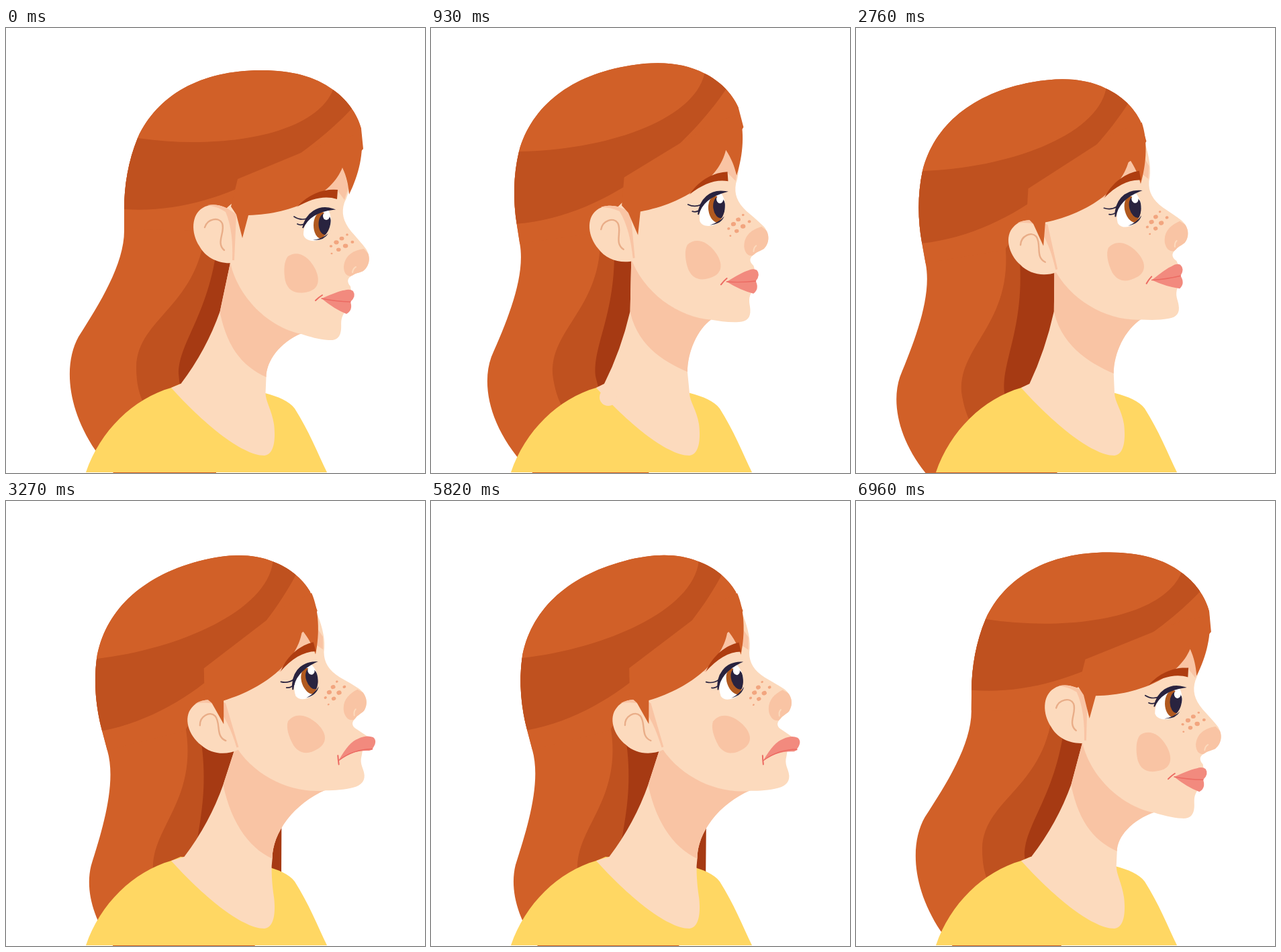
Write an HTML page with a canvas that moves like this. It is 624 px wide and 663 px high and loops after 7470 ms.

```html
<!DOCTYPE html>
<html lang="en">
<head>
<meta charset="utf-8">
<title>Head in profile</title>
<style>
html, body { margin: 0; width: 100%; height: 100%; overflow: hidden; background: #fff; }
canvas { display: block; }
</style>
</head>
<body>
<canvas id="stage" width="624" height="663"></canvas>
<script>
const ctx = document.getElementById('stage').getContext('2d');
const LOOP = 7470, STEP = 30;

const C = {
  hair: '#d16028', shade: '#bf511f', dark: '#a63a13',
  skin: '#fcdabd', blush: '#f9c4a4', freckle: '#f2a57f', earLine: '#e9ad88',
  shirt: '#ffd763', ink: '#29233f', iris: '#b0591f', brow: '#ae3d10',
  lip: '#f28a7e', lipLine: '#ec6a62'
};

// Key poses: face x, y, angle, then hair x, y, angle
const pose = {
  rest: [471, 293, 0, 196, 164, 0],
  nod: [496, 334, -9, 226, 180, -10.5],
  rise: [426, 269, 8, 131, 184, 8.9],
  back: [377, 272, 15.5, 57, 218, 9.2],
  push: [413, 269, 15, 99, 213, 10.3],
  out: [453, 267, 19, 135, 235, 15],
  fall: [467, 288, 8, 165, 192, 3.4],
  dip: [474, 300, 0, 194, 180, -3],
  settle: [473, 301, 1, 193, 176, -0.5]
};
const timeline = [
  [0, pose.rest], [540, pose.nod], [930, pose.rise], [1560, pose.back], [2160, pose.back],
  [2760, pose.push], [3060, pose.out], [5760, pose.out], [6300, pose.fall],
  [6510, pose.dip], [6960, pose.settle]
];

const P = d => new Path2D(d);
const SIL = 'M529,150 C523,127 507,106 487,92 C460,72 425,63 380,63 C290,63 225,100 196,164 C182,198 176,235 176,270 ';
const shapes = {
  back: P(SIL + 'L176,300 C177,350 140,410 108,460 C86,500 90,565 133,629 L175,682 L313,705 L313,540 L375,440 L390,320Z'),
  under: P('M298,290 C290,415 196,430 194,505 C194,530 198,545 206,562 L230,590 L300,590 L340,290Z'),
  inner: P('M317,295 C310,420 257,465 257,515 L262,565 L372,575 L380,540 L398,474 L400,445 L390,310Z'),
  crown: P(SIL + 'L176,300 L295,302 L335,262 L480,215 L514,200 L532,180Z'),
  band: P('M196,164 C320,182 460,160 487,92 L530,92 L515,120 C450,190 320,280 176,270 L150,270 L150,164Z'),
  fringe: P('M335,266 L343,278 L352,313 L361,279 C430,277 485,248 501,208 C507,221 510,234 511,248 C526,218 533,185 529,158 L490,165 L345,225Z'),
  browShade: P('M501,204 L510,238 L504,256 L492,240 C470,243 450,252 434,267 L400,250Z'),
  cheek: P('M420,340 C432,332 448,336 460,358 C469,376 465,389 450,393 C434,397 421,394 416,377 C413,362 414,347 420,340Z'),
  nose: P('M503,355 C505,338 518,331 533,329 L552,350 L536,370 L515,370 C506,370 503,364 503,355Z'),
  ear: P('M343,278 C325,262 305,260 293,268 C276,278 275,305 288,325 C297,342 317,352 338,350 L343,330Z'),
  earShade: P('M300,264 C315,261 330,267 343,278 L340,346 L337,346 C338,320 336,295 327,274 Q315,266 300,264Z'),
  earFold: P('M296,297 C300,284 317,281 322,291 C327,304 312,320 325,331'),
  eye: P('M443,308 C443,286 461,268 479,270 C487,280 486,305 466,316 C455,319 445,316 443,308Z'),
  lash: P('M487,270 C465,263 447,276 442,298 C449,282 463,273 487,270Z'),
  flicks: P('M448,284 Q438,287 429,281 M446,291 Q440,295 434,292'),
  lowLash: P('M457,316 Q471,314 480,306 Q474,317 457,316Z'),
  brow: P('M434,266 C452,246 475,239 494,241 L493,255 C475,249 455,254 434,266Z'),
  shirt: P('M119,662 C140,600 190,552 246,536 L260,530 L386,544 C405,549 422,556 430,567 C450,598 465,635 478,662Z')
};

const mix = (a, b, u) => a + (b - a) * u;

function ramp(t, from, to) {
  const u = Math.min(1, Math.max(0, (t - from) / (to - from)));
  return u * u * (3 - 2 * u);
}

// Hermite curve through the key poses that never overshoots them
function sample(t) {
  let i = 0;
  while (i < timeline.length - 1 && t >= timeline[i + 1][0]) i++;
  const [t0, a] = timeline[i];
  if (i === timeline.length - 1) return a;
  const [t1, b] = timeline[i + 1], span = t1 - t0, u = (t - t0) / span;
  const slope = (j, k) => (timeline[j + 1][1][k] - timeline[j][1][k]) / (timeline[j + 1][0] - timeline[j][0]);
  const tangent = (j, k) => {
    if (j === 0 || j === timeline.length - 1) return 0;
    const p = slope(j - 1, k), q = slope(j, k);
    return p * q <= 0 ? 0 : 2 * p * q / (p + q);
  };
  return a.map((v, k) => mix(v, b[k], u * u * (3 - 2 * u))
    + span * u * (1 - u) * (tangent(i, k) * (1 - u) - tangent(i + 1, k) * u));
}

function fill(shape, color) {
  ctx.fillStyle = color;
  ctx.fill(shape);
}

function line(shape, color, width) {
  ctx.strokeStyle = color;
  ctx.lineWidth = width;
  ctx.lineCap = 'round';
  ctx.stroke(shape);
}

function oval(x, y, rx, ry, color) {
  ctx.fillStyle = color;
  ctx.beginPath();
  ctx.ellipse(x, y, rx, ry, 0, 0, Math.PI * 2);
  ctx.fill();
}

function clipped(shape, draw) {
  ctx.save();
  ctx.clip(shape);
  draw();
  ctx.restore();
}

// Runs draw in a frame whose anchor sits at the posed position.
function posed([x, y, angle], [ax, ay], draw) {
  ctx.save();
  ctx.translate(x, y);
  ctx.rotate(-angle * Math.PI / 180);
  ctx.translate(-ax, -ay);
  draw();
  ctx.restore();
}

function facePoint([x, y, angle], px, py) {
  const a = angle * Math.PI / 180, dx = px - pose.rest[0], dy = py - pose.rest[1];
  return [x + dx * Math.cos(a) + dy * Math.sin(a), y - dx * Math.sin(a) + dy * Math.cos(a)];
}

function drawBackHair() {
  fill(shapes.back, C.hair);
  clipped(shapes.back, () => fill(shapes.under, C.shade));
  fill(shapes.inner, C.dark);
}

function drawCrown() {
  fill(shapes.crown, C.hair);
  clipped(shapes.crown, () => fill(shapes.band, C.shade));
}

// The neck hangs between the fixed collar and the moving ear and chin.
function drawNeck(face, t) {
  const [ex, ey] = facePoint(face, 334, 350);
  const [cx, cy] = facePoint(face, 440, 455);
  const lx = 320 + 0.62 * (ex - 336), ly = 422;
  const rx = 375 + 0.25 * (cx - 390), ry = 503 + 0.35 * (cx - 390);
  const base = 258 + Math.max(0, rx - 383) * 0.55;
  const end = Math.max(rx, 386) - 1;

  const neck = P(`M${Math.max(ex, lx)},${ey} L${lx},${ly} Q${mix(base, lx, 0.65)},480 ${base},530 L246,536
    C290,585 350,637 385,637 C402,635 401,605 399,590 C396,570 ${end},556 ${end},544 L${rx},${ry}
    C${rx},${mix(cy, ry, 0.62)} ${mix(cx, rx, 0.6)},${mix(cy, ry, 0.2)} ${cx},${cy} L${cx},${cy - 60}Z`);
  fill(neck, C.skin);
  if (t >= 780 && t < 2280) oval(264, 550, 13, 13, C.skin);

  clipped(neck, () => fill(P(`M${lx - 40},250 L${lx - 2},${ly - 8}
    C${lx + 8},${ly + 50} ${rx - 38},${ry - 17} ${rx + 1},${ry} h130 V250Z`), C.blush));
}

function drawMouth(open, frown) {
  const at = (x, y, ox, oy, fx, fy) => [x + ox * open + fx * frown, y + oy * open + fy * frown];
  const mid = (a, b, dx, dy) => [(a[0] + b[0]) / 2 + dx, (a[1] + b[1]) / 2 + dy];
  const bent = open + frown;
  const corner = at(470, 403, -9, 6, 2, 17);
  const crest = at(512, 390, 0, -11, 12, 9);
  const tip = at(519, 398, 4, -10, 15, 12);
  const upper = at(513, 408, 9, -13, 12, 12);
  const lower = at(513, 408, 4, 12, 12, 12);
  const bottom = at(507, 426, -7, 6, 13, -5);
  const bow = mid(corner, crest, 5 - 7 * frown, -5 - 6 * bent);
  const rise = mid(bow, crest, 0, 0);
  const topLine = mid(corner, upper, 0, 2 - 11 * frown);
  const lowLine = mid(corner, lower, 0, 2 + 2 * open - 11 * frown);
  const belly = mid(corner, bottom, 0, 4 - 13 * frown);

  fill(P(`M${corner} Q${topLine} ${upper} h14 L${lower[0] + 14},${lower[1]} L${lower} Q${lowLine} ${corner}Z`), '#fff');
  fill(P(`M${corner} Q${lowLine} ${lower} Q${lower[0] + 4},${mix(lower[1], bottom[1], 0.7)} ${bottom} Q${belly} ${corner}Z`), C.lip);
  fill(P(`M${corner} Q${bow} ${rise} Q${crest[0]},${crest[1] - 2} ${tip[0] - 2},${tip[1] - 6}
    Q${tip[0] + 3},${tip[1] + 2} ${upper} Q${topLine} ${corner}Z`), C.lip);
  line(P(`M${corner} Q${topLine} ${upper}`), C.lipLine, 1.4);

  const dx = 5 - 3.5 * bent, dy = 4 + 2.5 * bent, x = corner[0] - 4 * (1 - bent), y = corner[1] - 1;
  line(P(`M${x + dx},${y - dy} Q${x},${y - 1} ${x - dx},${y + dy}`), C.lipLine, 2);
}

function drawEye(blink) {
  ctx.save();
  ctx.translate(0, 302 * blink * 0.9);
  ctx.scale(1, 1 - 0.9 * blink);
  fill(shapes.eye, '#fff');
  clipped(shapes.eye, () => {
    oval(470, 294, 12, 20, C.iris);
    oval(475, 292, 9.5, 16, C.ink);
    oval(477, 280, 5, 6, '#fff');
  });
  fill(shapes.lash, C.ink);
  line(shapes.lash, C.ink, 1.8);
  fill(shapes.lowLash, C.ink);
  line(shapes.flicks, C.ink, 1.7);
  ctx.restore();
}

function drawFreckles() {
  for (let row = 0; row < 2; row++) {
    for (let i = 0; i < 4; i++) {
      const r = 1.5 + 2.3 * Math.sin(0.9 * i + 0.3 * (1 - row));
      oval(484 + row + i * (8 + 2.3 * row), 325 + 11 * row - 5.7 * i, r, r * 0.85, C.freckle);
    }
  }
}

function drawFace(open, frown) {
  const fx = 6 * frown, fy = 5 * frown, jaw = 5 * open + 3 * frown;
  const head = P(`M330,345 L325,270 L420,200 L505,190 L513,205 C514,225 512,245 504,260 C499,275 502,288 514,303
    C522,312 530,321 536,329 C545,343 540,356 532,362 C526,365 521,365 517,368 C508,372 507,378 513,385
    L${514 + 2 * fx},${392 + 2 * fy} L${507 + fx},${408 + fy} L${504 + jaw},424
    C${497 + jaw},434 ${500 + jaw},442 ${499 + jaw},449 C${498 + jaw},461 492,466 480,465
    C466,464 452,460 440,456 C392,446 344,402 333,345Z`);
  fill(head, C.skin);
  clipped(head, () => {
    fill(shapes.browShade, C.blush);
    fill(shapes.nose, C.blush);
    drawFreckles();
  });
  line(P('M516,364 Q517,358 521,356'), C.skin, 2);
  fill(shapes.cheek, C.blush);
  drawMouth(open, frown);
}

function drawEar() {
  fill(shapes.ear, C.skin);
  fill(shapes.earShade, C.blush);
  line(shapes.earFold, C.earLine, 2.4);
}

function render(t) {
  const now = sample(t), face = now.slice(0, 3), hair = now.slice(3);
  const open = ramp(t, 1000, 1500) - ramp(t, 2280, 2700);
  const frown = ramp(t, 2760, 3060) - ramp(t, 5760, 6250);
  const blink = t > 4860 && t < 5160 ? Math.sin(Math.PI * (t - 4860) / 300) : 0;

  // A slow breath while the head is held back
  if (t > 1560 && t < 2160) hair[0] -= 2 * Math.sin(Math.PI * (t - 1560) / 300) ** 2 * 0.5;

  // Fringe and ear slide a little against the skull as the head tips
  const [hx, hy, ha] = hair, [fx, fy, fa] = face;
  const fringe = [hx, hy - 1.5 * (fa - ha), ha];
  const ear = [fx, fy + 0.35 * fa, fa];
  const onHair = (at, draw) => posed(at, pose.rest.slice(3, 5), draw);
  const onFace = (at, draw) => posed(at, pose.rest.slice(0, 2), draw);

  ctx.fillStyle = '#fff';
  ctx.fillRect(0, 0, 624, 663);
  onHair(hair, drawBackHair);
  fill(shapes.shirt, C.shirt);
  drawNeck(face, t);
  onFace(face, () => drawFace(open, frown));
  onHair(hair, drawCrown);
  onFace(ear, drawEar);
  onHair(fringe, () => fill(shapes.fringe, C.hair));
  onFace(face, () => {
    drawEye(blink);
    ctx.translate(0, 4 * blink);
    fill(shapes.brow, C.brow);
  });
}

const start = performance.now();
function tick(now) {
  const t = Math.max(0, now - start) % LOOP;
  render(Math.floor(t / STEP) * STEP);
  requestAnimationFrame(tick);
}
render(0);
requestAnimationFrame(tick);
</script>
</body>
</html>
```
